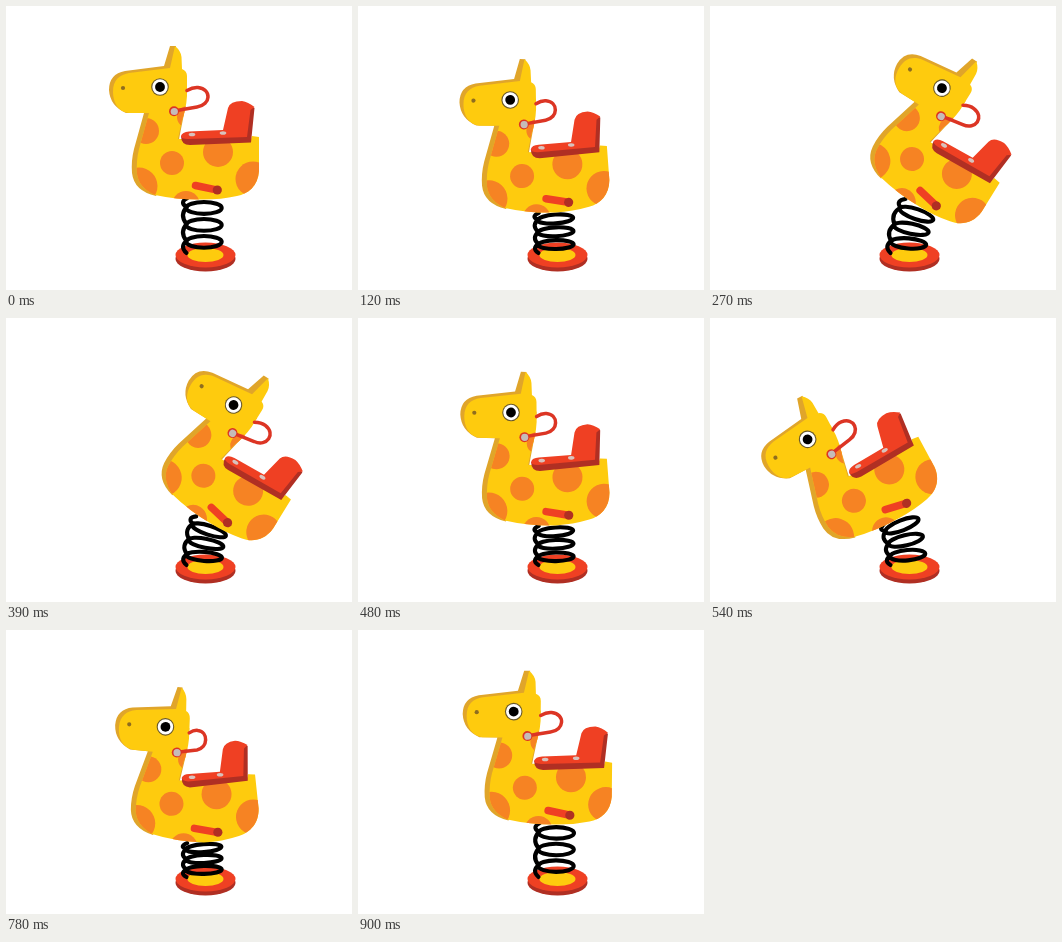
An HTML page with a canvas that plays this animation: 346 by 284 pixels, repeating every 0.93 s.

```html
<!DOCTYPE html>
<html lang="en">
<head>
<meta charset="utf-8">
<title>Spring rider</title>
<style>
  html, body { margin: 0; width: 100%; height: 100%; overflow: hidden; background: #fff; }
  canvas { display: block; }
</style>
</head>
<body>
<canvas id="stage" width="346" height="284"></canvas>
<script>
const ctx = document.getElementById('stage').getContext('2d');
const LOOP = 930, STEP = 30, PIVOT_X = 198, PIVOT_Y = 159;
const RED = '#ef4023', DARK_RED = '#b02f23', YELLOW = '#fecb0e', OCHRE = '#e0a52a', ORANGE = '#f68323';

// Swing in degrees and compression in pixels, as [time, value]
const SWING = [[0, 0], [120, -2], [300, 33], [360, 33], [595, -34], [840, 3], [LOOP, 0]];
const SINK = [[0, 0], [120, 13], [300, 12.6], [400, 17.5], [560, 10.4], [780, 19], [LOOP, 0]];

const rad = deg => deg * Math.PI / 180;
const ease = u => u * u * u * (10 - 15 * u + 6 * u * u);

function valueAt(keys, t) {
  const i = keys.findLastIndex(k => k[0] <= t);
  const [t0, a] = keys[i], [t1, b] = keys[i + 1];
  return a + (b - a) * ease((t - t0) / (t1 - t0));
}

let lean, sink, shift, fold;

function setPose(t) {
  lean = valueAt(SWING, t);
  sink = valueAt(SINK, t);
  shift = 0.95 * lean + (12.6 - sink) * Math.abs(lean) / 32;
  fold = sink * sink / 60 * Math.exp(-Math.abs(lean) / 10);
}

// Leans the rider and folds its two halves upward around the pivot
function warp(x, y) {
  const u = x - PIVOT_X, v = y - PIVOT_Y;
  const a = rad(lean - fold * Math.tanh(u / 30));
  return [
    PIVOT_X + shift + u * Math.cos(a) - v * Math.sin(a),
    PIVOT_Y + sink + u * Math.sin(a) + v * Math.cos(a)
  ];
}

const shape = d => new Path2D(d.replace(/([\d.]+),([\d.]+)/g, (_, x, y) => warp(+x, +y).map(n => n.toFixed(2)).join()));

function fill(d, color) {
  ctx.fillStyle = color;
  ctx.fill(shape(d));
}

function line(path, color, width) {
  ctx.strokeStyle = color;
  ctx.lineWidth = width;
  ctx.stroke(path);
}

function oval(x, y, rx, ry, color, angle = 0) {
  ctx.beginPath();
  ctx.ellipse(x, y, rx, ry, angle, 0, 7);
  ctx.fillStyle = color;
  ctx.fill();
}

function dot(x, y, r, color, ry = r) {
  oval(...warp(x, y), r, ry, color, rad(lean));
}

function drawBase() {
  oval(199.5, 253, 30, 12.5, DARK_RED);
  oval(199.5, 249, 30, 12.5, RED);
  oval(199.5, 249, 18, 7, YELLOW);
}

// Three rings along a bent axis, joined by hooks on their left side
function drawSpring() {
  const [topX, topY] = warp(198, 194), height = 247 - topY;
  const tilt = s => rad((0.8 * lean - 0.25 * sink) * s);
  const at = (s, x) => [
    198 + (topX - 198) * s * s + x * Math.cos(tilt(s)),
    247 - height * s + x * Math.sin(tilt(s))
  ];
  for (let i = 0; i < 4; i++) {
    const s = 0.21 + 0.32 * i;
    const coil = new Path2D();
    if (i < 3) coil.ellipse(...at(s, 0), 17.7, Math.max(4, height / 9), tilt(s), 0, 7);
    const from = Math.min(s + 0.04, 1.04), to = Math.max(s - 0.3, 0);
    coil.moveTo(...at(from, -16.5));
    coil.quadraticCurveTo(...at((from + to) / 2, -25), ...at(to, -17.5));
    line(coil, '#000', 4.1);
  }
}

function drawBody() {
  fill('M164,40 L170,40 L168,64 L181,80 L178,108 L174,128 L170,150 L150,190 ' +
    'Q128,185 126,167 Q125,155 128,143 L138,107 L120,107 Q104,100 103,84 ' +
    'Q103,68 119,65 L158,60 Z', OCHRE);

  const skin = 'M169,40 Q175,45 175.5,51 L176,63 Q181,65 181,70 L181,90 Q180,104 176,114 L172,133 ' +
    'L245,133 L246,130 L253,131 L253,165 C252,180 242,188 231,190 Q215,193.5 198,193.5 ' +
    'Q172,194 149,189 Q133,182 131,168 Q130,155 133,143 L143,107 L123,107 ' +
    'C112,106 107,96 107,86 C107,74 113,69 123,67 L164,62 Z';
  fill(skin, YELLOW);

  ctx.save();
  ctx.clip(shape(skin));
  dot(166, 157, 12, ORANGE);
  dot(212, 146, 15, ORANGE);
  dot(247, 173, 17.5, ORANGE);
  dot(133, 180, 18.5, ORANGE);
  dot(140, 125, 13, ORANGE);
  dot(180, 199, 14, ORANGE);
  dot(182, 111, 11, ORANGE);
  ctx.restore();
}

function drawSeat() {
  fill('M175,130 Q175,139 184,139 L245,136.5 L248.5,102 L238,97 L235,125 Z', DARK_RED);
  fill('M175,130 Q176,126 183,125.5 L217,124 L222,102 Q224,95 236,95 Q242,96 248.5,101 ' +
    'L244.5,104 L241,131 L182,133 Q175,133 175,130 Z', RED);
  dot(186, 128.5, 3.3, '#d8c2bd', 1.8);
  dot(217, 127, 3.3, '#d8c2bd', 1.8);
}

function drawDetails() {
  line(shape('M189.5,179.5 L208,183.3'), RED, 7.5);
  dot(211.3, 184, 4.6, DARK_RED);

  line(shape('M168,105 L191,101 C205,99 206,83 192,81.5 Q187,81 181,84.5'), '#dc3524', 3.5);
  dot(168, 105.3, 5, '#dc3524');
  dot(168.3, 105.5, 3.6, '#c5bcb9');

  dot(154, 81, 8.8, '#6b5a2a');
  dot(154, 81, 7.7, '#fff');
  dot(154, 81, 4.9, '#000');
  dot(117, 82, 2.1, '#8f6d1f');
}

function frame(now) {
  setPose(Math.floor(now % LOOP / STEP) * STEP);
  ctx.fillStyle = '#fff';
  ctx.fillRect(0, 0, 346, 284);
  ctx.lineCap = 'round';
  drawBase();
  drawSpring();
  drawBody();
  drawSeat();
  drawDetails();
  requestAnimationFrame(frame);
}

frame(performance.now());
</script>
</body>
</html>
```
